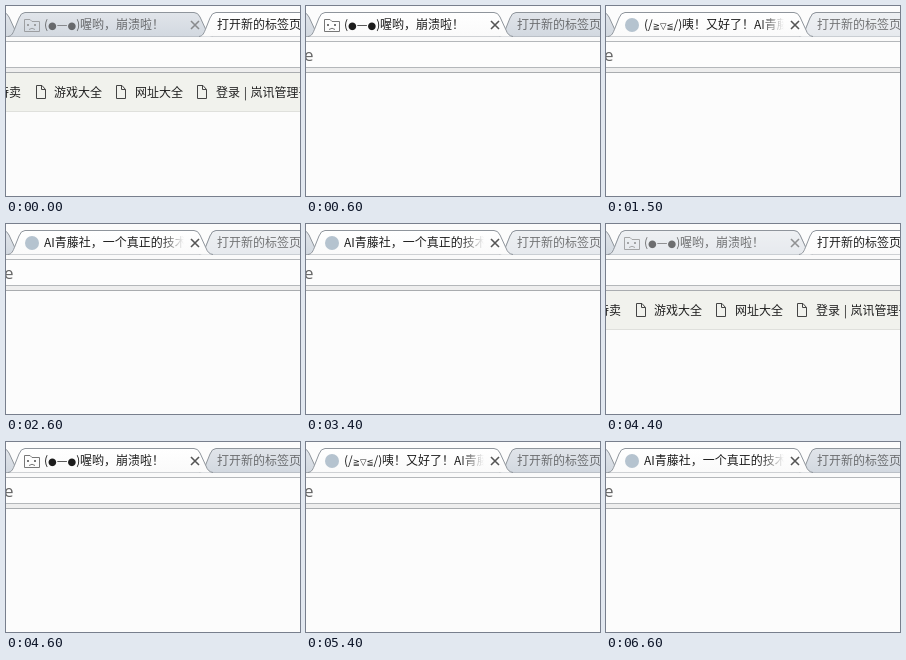
Animation, 294 px wide and 190 px high, one loop 7.2 s. Source, as an HTML page:

```html
<!DOCTYPE html>
<html lang="zh">
<head>
<meta charset="utf-8">
<style>
  html, body { margin: 0; width: 100%; height: 100%; overflow: hidden; background: #fcfcfc; }
  svg { display: block; }
  text { font: 12px "Noto Sans CJK SC", "Noto Sans CJK", sans-serif; fill: #222; white-space: pre; word-spacing: 1px; }
  .title text { font-family: "Noto Sans CJK JP", "Noto Sans CJK", sans-serif; fill: url(#fade); }
  .face { font-family: "DejaVu Sans", sans-serif; }
  .dot { font-size: 10px; }
  .eye { font-size: 8.500px; }
  .tab, .glow { stroke: #8f959c; }
  .tab { fill: url(#idle); }
  .glow { fill: #fff; }
  .active .tab { fill: url(#front); }
  .active .glow { display: none; }
  .back .label { opacity: .6; }
  .icon { fill: none; stroke: #444; }
</style>
</head>
<body>
<svg width="294" height="190" viewBox="0 0 294 190">
  <defs>
    <linearGradient id="idle" x2="0" y2="1">
      <stop stop-color="#e1e5ea"/><stop offset="1" stop-color="#d2d8e0"/>
    </linearGradient>
    <linearGradient id="front" x2="0" y2="1">
      <stop stop-color="#fff"/><stop offset="1" stop-color="#fafafa"/>
    </linearGradient>
    <linearGradient id="fade" gradientUnits="userSpaceOnUse" x1="154" x2="178" y1="0" y2="0">
      <stop stop-color="#1c1c1c"/><stop offset="1" stop-color="#1c1c1c" stop-opacity="0"/>
    </linearGradient>
    <path id="shape" d="M2 30.500C6 30 7 27 9 22L13 12Q15 6.500 19 6.500H188Q192 6.500 194 11L200 24Q202 30 207 30.500"/>
    <path id="doc" class="icon" d="M.5 .5H6L9.500 4.500V13.500H.5ZM5.500 .5V4.500H9.500"/>
  </defs>

  <rect y="31" width="294" height="36" fill="#fafafa"/>
  <use href="#shape" x="-191" class="tab"/>
  <path d="M0 30.500H294" stroke="#a3a8ae"/>
  <g id="tabs">
    <g id="left">
      <use href="#shape" class="tab"/>
      <use href="#shape" class="glow"/>
      <g class="label">
        <g id="crash" class="title">
          <g fill="none" stroke="#777">
            <path d="M18.500 25.500V13.500H24L26 15.500H33.500V25.500Z"/>
            <path d="M21 18l2 2m0-2l-2 2M28 18l2 2m0-2l-2 2M23 23.500q3-2.500 6 0"/>
          </g>
          <text x="38" y="23">(<tspan class="face dot">●</tspan>—<tspan class="face dot">●</tspan>)</text>
          <text x="74" y="23">喔哟，崩溃啦！</text>
        </g>
        <g id="okay" class="title">
          <circle cx="26" cy="19" r="7" fill="#b5c3cf"/>
          <g id="joy">
            <text x="38" y="23">(/<tspan class="face eye">≧▽≦</tspan>/)</text>
            <text x="76" y="23">咦！又好了！AI青藤社</text>
          </g>
          <text id="plain" x="38" y="23">AI青藤社，一个真正的技术</text>
        </g>
        <path d="M185 15l8 8m0-8l-8 8" stroke="#555" stroke-width="1.600"/>
      </g>
    </g>
    <g id="right">
      <use href="#shape" x="191" class="tab"/>
      <use href="#shape" x="191" class="glow"/>
      <text x="211" y="23" class="label">打开新的标签页</text>
    </g>
  </g>

  <rect y="36" width="294" height="25" fill="#fdfdfd"/>
  <path d="M0 35.500H294M0 61.500H294" stroke="#b4b7ba"/>
  <rect y="62" width="294" height="4" fill="#eee"/>
  <path d="M0 66.500H294" stroke="#a9acaf"/>
  <text id="url" x="-2" y="55" style="font:17px 'Open Sans',sans-serif;fill:#666">e</text>

  <g id="marks">
    <rect y="67" width="294" height="39" fill="#f1f2ed"/>
    <path d="M0 105.500H294" stroke="#dfe0dc"/>
    <text x="-9" y="91">特卖</text>
    <use href="#doc" x="30" y="79"/><text x="48" y="91">游戏大全</text>
    <use href="#doc" x="110" y="79"/><text x="129" y="91">网址大全</text>
    <use href="#doc" x="191" y="79"/><text x="210" y="91">登录 | 岚讯管理平台</text>
  </g>
</svg>
<script>
const $ = id => document.getElementById(id);
const show = (id, on) => { $(id).style.display = on ? '' : 'none'; };
const within = (t, a, b) => t >= a && t < b;

// Hover highlight rising in four 100 ms steps
const rise = (t, start) => Math.max(0, Math.min(1, Math.floor((t - start) / 100 + 1) / 4));

function leftGlow(t) {
  return t < 600 ? rise(t, 200) : rise(t, 3800);
}

// The pointer rests on the right tab, later it only passes over
function rightGlow(t) {
  if (t < 3600) return rise(t, 1200);
  const step = Math.floor((t - 5000) / 100);
  return [.25, .5, .5, .25][step] || 0;
}

let front;
function draw(now) {
  const t = now % 7200;
  const first = within(t, 600, 3600) || t >= 4600;
  const crashed = !(within(t, 800, 3600) || t >= 4800);
  const joyful = within(t, 800, 2600) || within(t, 4800, 6600);

  if (front !== first) {
    front = first;
    const [top, under] = first ? ['left', 'right'] : ['right', 'left'];
    $(top).setAttribute('class', 'active');
    $(under).setAttribute('class', 'back');
    $('tabs').append($(top));
  }
  $('left').querySelector('.glow').style.opacity = leftGlow(t) * .45;
  $('right').querySelector('.glow').style.opacity = rightGlow(t) * .45;

  show('crash', crashed);
  show('okay', !crashed);
  show('joy', joyful);
  show('plain', !joyful);
  show('url', first);
  show('marks', !first);
  requestAnimationFrame(draw);
}
draw(performance.now());
</script>
</body>
</html>
```
